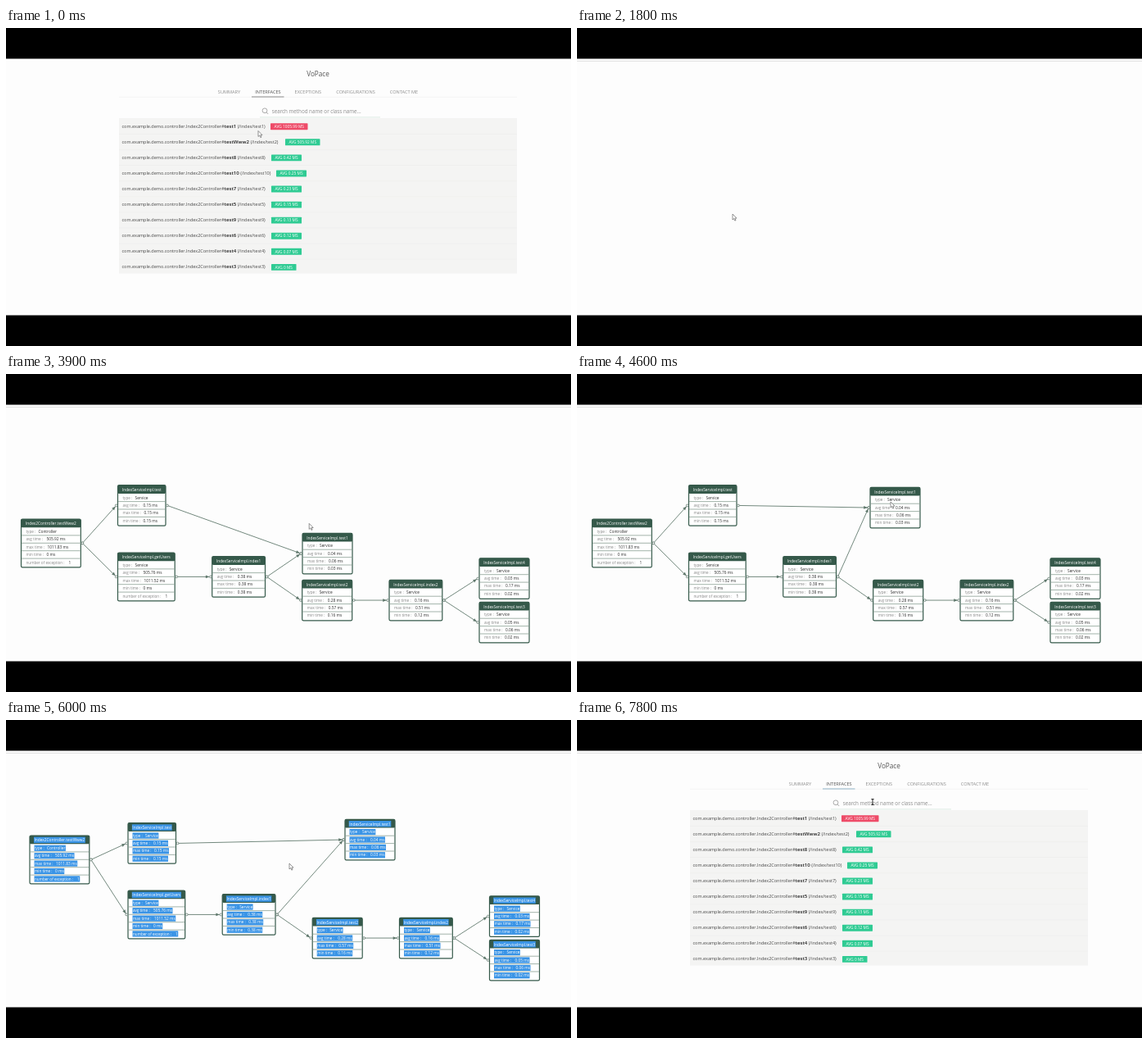
An HTML page for the animation above (8000 ms loop, 690 by 388 pixels).

```html
<!DOCTYPE html>
<html lang="en">
<head>
<meta charset="utf-8">
<title>Method timing demo</title>
<style>
html, body { margin: 0; width: 100%; height: 100%; overflow: hidden; background: #000; }
svg { display: block; width: 100vw; height: 100vh; font-family: "Open Sans", "Noto Sans", sans-serif; }
.sel { display: none; fill: #3a94e6; }
.selected .sel { display: inline; }
.selected text { fill: #fff; }
</style>
</head>
<body>
<svg id="stage" viewBox="0 0 690 388"></svg>
<script>
const LOOP = 8000, STEP = 100;
const stage = document.getElementById('stage');

function el(tag, attrs, parent = stage, text) {
  const node = document.createElementNS('http://www.w3.org/2000/svg', tag);
  for (const key in attrs) node.setAttribute(key, attrs[key]);
  if (text !== undefined) node.textContent = text;
  parent.appendChild(node);
  return node;
}
const rect = (x, y, width, height, fill, parent, more) =>
  el('rect', { x, y, width, height, fill, ...more }, parent);
const line = (x1, y1, x2, y2, stroke, width, parent) =>
  el('line', { x1, y1, x2, y2, stroke, 'stroke-width': width }, parent);
const label = (x, y, size, fill, text, parent, more) =>
  el('text', { x, y, 'font-size': size, fill, ...more }, parent, text);
const show = (node, on) => node.setAttribute('display', on ? 'inline' : 'none');

// Linear interpolation over [time, x, y] keys
function along(keys, t) {
  if (t <= keys[0][0]) return keys[0].slice(1);
  for (let i = 1; i < keys.length; i++) {
    const a = keys[i - 1], b = keys[i];
    if (t <= b[0]) {
      const k = (t - a[0]) / (b[0] - a[0]);
      return [a[1] + (b[1] - a[1]) * k, a[2] + (b[2] - a[2]) * k];
    }
  }
  return keys[keys.length - 1].slice(1);
}

rect(0, 0, 690, 388, '#000');
rect(0, 37.5, 690, 313, '#fdfdfd');
const topLine = line(0, 40.3, 690, 40.3, '#dcdcdc', 0.9);

// Method list
const list = el('g', {});
label(381, 59.2, 8.2, '#555', 'VoPace', list, { 'text-anchor': 'middle' });
line(138, 84.3, 624, 84.3, '#f1f1f1', 0.7, list);
[['SUMMARY', 272.5], ['INTERFACES', 320], ['EXCEPTIONS', 368.8], ['CONFIGURATIONS', 427], ['CONTACT ME', 486]]
  .forEach(([name, x], i) =>
    label(x, 79.6, 5.6, i === 1 ? '#505050' : '#8c8c8c', name, list, { 'text-anchor': 'middle' }));
const tabLine = line(300, 84, 339.5, 84, '#8fb4c8', 1.2, list);
el('circle', { cx: 316, cy: 100.8, r: 2.9, fill: 'none', stroke: '#8a8a8a', 'stroke-width': 0.7 }, list);
line(318.1, 102.9, 320.2, 105, '#8a8a8a', 0.7, list);
label(324.7, 103.5, 6.25, '#8c8c8c', 'search method name or class name...', list);
line(310, 108.9, 457, 108.9, '#d5e6dc', 0.8, list);
rect(138, 110, 486, 189.5, '#f4f4f3', list);

const methods = [
  ['test1', '1005.99', 323, 45.5], ['testWww2', '505.92', 341, 42.5], ['test8', '0.42', 324, 37],
  ['test10', '0.25', 330, 37], ['test7', '0.23', 324, 37], ['test5', '0.15', 324, 37],
  ['test9', '0.13', 324, 37], ['test6', '0.12', 324, 37], ['test4', '0.07', 324, 37], ['test3', '0', 324, 30.5]
];
methods.forEach(([name, avg, x, width], i) => {
  const y = 119.9 + i * 19.07;
  const path = name === 'testWww2' ? 'test2' : name;
  const row = label(141.5, y + 1.9, 5.5, '#484848', undefined, list);
  el('tspan', {}, row, 'com.example.demo.controller.Index2Controller#');
  el('tspan', { 'font-weight': 600, 'font-size': 6.1, fill: '#222' }, row, name);
  el('tspan', {}, row, ` (/index/${path})`);
  rect(x, y - 3.6, width, 7.9, i ? '#2fcb93' : '#ee4b68', list, { rx: 0.6 });
  label(x + width / 2, y + 2.1, 4.8, '#fff', `AVG ${avg} MS`, list, { 'text-anchor': 'middle' });
  if (i < 9) line(138, y + 9.6, 624, y + 9.6, '#ececeb', 0.6, list);
});

// Call graphs
const GREEN = '#35594a', EDGE = '#73897e';

function makeCard(parent, x, y, w, name, type, avg, max, min, errors) {
  const g = el('g', {}, parent);
  const h = errors ? 58.8 : 49.5;
  rect(0, 0, w, h, '#fff', g, { rx: 1.6, stroke: GREEN, 'stroke-width': 1.2 });
  rect(0, 0, w, 10.3, GREEN, g, { rx: 1.4 });
  const mark = (t, left, top, width, height) => {
    g.insertBefore(rect(left, top, width, height, '', g, { class: 'sel' }), t);
  };
  const title = label(w / 2, 7.3, 4.8, '#fff', name, g, { 'text-anchor': 'middle' });
  const tw = title.getComputedTextLength();
  title.parentNode.insertBefore(rect((w - tw) / 2 - 0.5, 1.7, tw + 1, 7.4, '#3a94e6', g, { class: 'sel' }), title);
  const rows = [['type', type, 21], ['avg time', avg + ' ms', 31], ['max time', max + ' ms', 32], ['min time', min + ' ms', 31]];
  if (errors) rows.push(['number of exception', errors, 58]);
  rows.forEach(([key, value, vx], i) => {
    const cy = 15.2 + i * 9.4;
    if (i) line(0.6, cy - 4.7, w - 0.6, cy - 4.7, '#8ba095', 0.8, g);
    const k = label(6, cy + 1.7, 4.6, '#858585', key + ' :', g);
    const v = label(vx, cy + 1.7, 4.8, '#2c2c2c', value, g);
    mark(k, 5.5, cy - 3.5, vx + v.getComputedTextLength() - 5, 7.2);
  });
  return { g, x, y, w, h, px: x, py: y };
}

function makeGraph(cards, links) {
  const g = el('g', {});
  const nodes = cards.map(c => makeCard(g, ...c));
  const edges = links.map(([a, b]) => ({
    a: nodes[a], b: nodes[b],
    path: line(0, 0, 0, 0, EDGE, 1, g),
    head: el('path', { d: 'M0 0L-4.5 -1.9V1.9Z', fill: '#5f786c' }, g),
    dots: [0, 1].map(() => el('circle', { r: 1.4, fill: '#fff', stroke: '#5f786c', 'stroke-width': 0.8 }, g))
  }));
  return { g, nodes, edges };
}

function place(graph, shifts) {
  graph.nodes.forEach((n, i) => {
    const [dx, dy] = shifts(i);
    n.px = n.x + dx;
    n.py = n.y + dy;
    n.g.setAttribute('transform', `translate(${n.px} ${n.py})`);
  });
  for (const { a, b, path, head, dots } of graph.edges) {
    const x1 = a.px + a.w + 2, y1 = a.py + a.h / 2, x2 = b.px - 1.8, y2 = b.py + b.h / 2;
    const angle = Math.atan2(y2 - y1, x2 - x1);
    const ex = x2 - 1.5 * Math.cos(angle), ey = y2 - 1.5 * Math.sin(angle);
    Object.entries({ x1, y1, x2: ex, y2: ey }).forEach(([k, v]) => path.setAttribute(k, v));
    head.setAttribute('transform', `translate(${ex} ${ey}) rotate(${angle * 180 / Math.PI})`);
    [[x1, y1], [x2, y2]].forEach(([x, y], i) => {
      dots[i].setAttribute('cx', x);
      dots[i].setAttribute('cy', y);
    });
  }
}

const impl = 'IndexServiceImpl.';
const small = makeGraph([
  [17.5, 225.5, 60.5, 'Index2Controller.test8', 'Controller', '0.42', '0.72', '0.11'],
  [123.5, 225.5, 61, impl + 'test3', 'Service', '0.04', '0.04', '0.04']
], [[0, 1]]);
const big = makeGraph([
  [18.5, 177, 72.8, 'Index2Controller.testWww2', 'Controller', '505.92', '1011.83', '0', '1'],
  [136.5, 135.7, 58.5, impl + 'test', 'Service', '0.15', '0.15', '0.15'],
  [136.5, 218, 69.7, impl + 'getUsers', 'Service', '505.76', '1011.52', '0', '1'],
  [251.7, 222.7, 64.8, impl + 'index1', 'Service', '0.38', '0.38', '0.38'],
  [358, 138.3, 61, impl + 'test1', 'Service', '0.04', '0.06', '0.03'],
  [361.7, 251.3, 61, impl + 'test2', 'Service', '0.28', '0.57', '0.16'],
  [468, 251.3, 64.8, impl + 'index2', 'Service', '0.16', '0.51', '0.12'],
  [578, 224.8, 61, impl + 'test4', 'Service', '0.03', '0.17', '0.02'],
  [578, 278.3, 61, impl + 'test3', 'Service', '0.05', '0.06', '0.02']
], [[0, 1], [0, 2], [1, 4], [2, 3], [3, 4], [3, 5], [5, 6], [6, 7], [6, 8]]);
place(small, () => [0, 0]);

const pan = [[4950, 0, 0], [5300, 52, -6], [5500, 12.5, -10], [6200, 12.5, -10],
  [6400, 13, -17], [6700, 21, 5.5], [6800, 19.5, 4.5]];
const drags = {
  0: [[5550, 0, 0], [5850, -2, -26]],
  4: [[4100, 4, 56], [4600, 0, 0], [4950, 43.5, -7]]
};

// Pointer
const arrow = el('path', {
  d: 'M0 0V7L1.6 5.5L2.8 8.1L4 7.6L2.8 5.1H5Z', fill: '#fff', stroke: '#666', 'stroke-width': 0.7
});
const beam = el('path', {
  d: 'M-1.6 -3.4H1.6M0 -3.4V3.4M-1.6 3.4H1.6', fill: 'none', stroke: '#222', 'stroke-width': 1
});
const moves = [[100, 308, 125.5], [400, 320, 156], [1000, 320, 156], [1400, 255, 200], [1800, 190, 227],
  [2300, 537, 144], [2700, 480, 280], [3200, 345, 138], [3600, 345, 138], [4100, 387, 212],
  [4600, 383, 156], [4950, 426, 149], [5000, 290, 185], [5300, 342, 179], [5500, 302, 175],
  [5550, 60, 185], [5850, 58, 159], [6000, 346, 175], [6200, 346, 175], [6400, 346, 168],
  [6600, 352, 184], [7400, 396, 62], [7800, 361, 100]];

function draw(now) {
  const t = Math.floor(now % LOOP / STEP) * STEP;
  show(topLine, t >= 600);
  show(list, t < 600 || (t >= 2700 && t < 3400) || t >= 7400);
  tabLine.setAttribute('stroke', t < 600 ? '#8c8c8c' : '#8fb4c8');
  show(small.g, t >= 1000 && t < 1800);

  const bigOn = t >= 3600 && t < 7000;
  show(big.g, bigOn);
  if (bigOn) {
    const [px, py] = along(pan, t);
    place(big, i => {
      const [dx, dy] = drags[i] ? along(drags[i], t) : [0, 0];
      return [px + dx, py + dy];
    });
    big.g.setAttribute('class', t >= 5100 && t < 6300 ? 'selected' : '');
  }

  const [x, y] = along(moves, t);
  const hidden = (t >= 2600 && t < 2800) || (t >= 6600 && t < 7500);
  const typing = t >= 7700;
  show(arrow, !hidden && !typing);
  show(beam, typing);
  (typing ? beam : arrow).setAttribute('transform', `translate(${x} ${y})`);
}

const start = performance.now();
function tick() {
  draw(performance.now() - start);
  requestAnimationFrame(tick);
}
tick();
</script>
</body>
</html>
```
